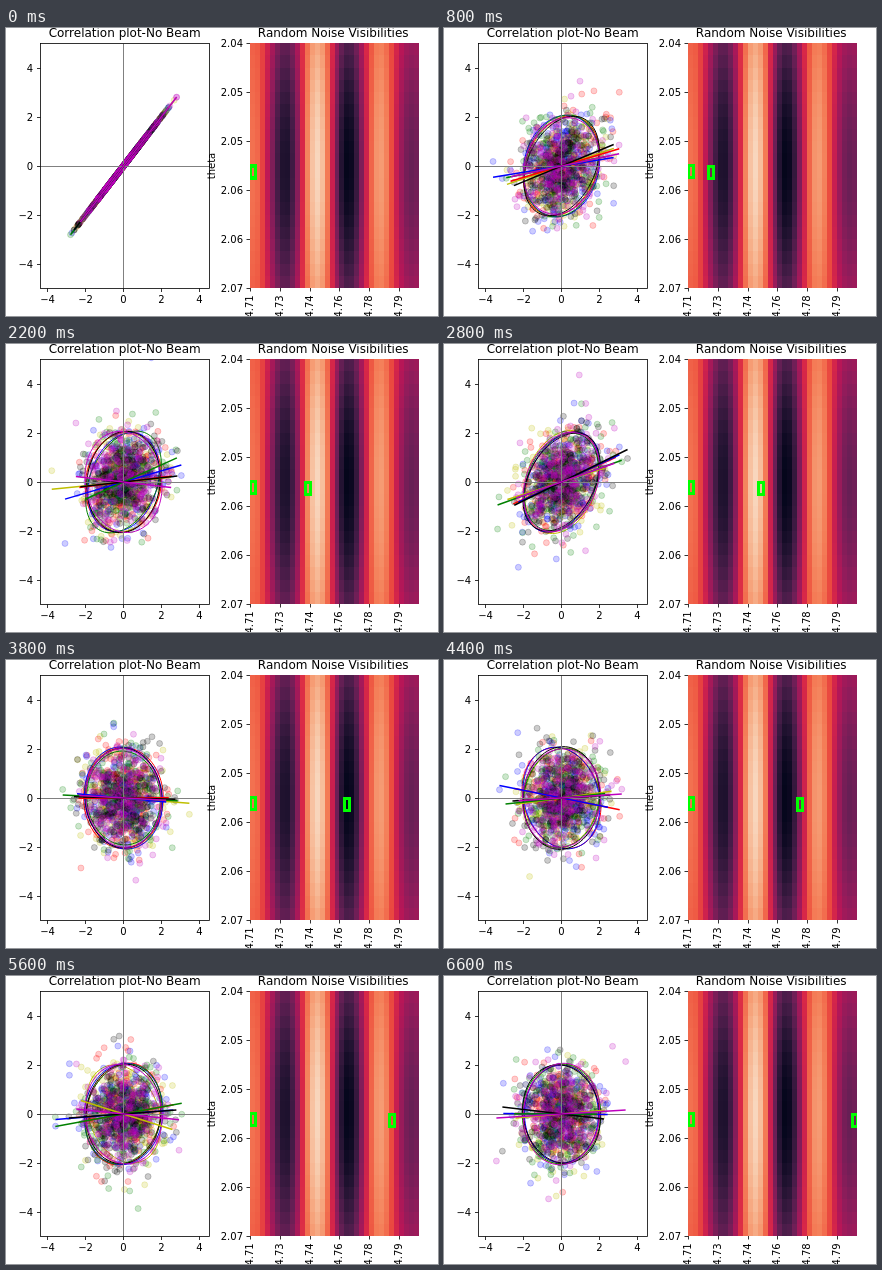
Recreate the animation shown at these times as an HTML page with a canvas. Size 432 by 288 pixels, loop 6.8 s.

```html
<!DOCTYPE html>
<html lang="en">
<head>
<meta charset="utf-8">
<title>Correlation plot</title>
<style>
  html, body { margin: 0; width: 100%; height: 100%; overflow: hidden; background: #fff; }
  canvas, svg { position: absolute; left: 0; top: 0; width: 432px; height: 288px; }
  text { font: 10px "DejaVu Sans", sans-serif; fill: #000; }
  .title { font-size: 12px; }
  line, rect { stroke: #000; stroke-width: .8; fill: none; }
</style>
</head>
<body>
<canvas id="plot" width="432" height="288"></canvas>
<svg id="axes" viewBox="0 0 432 288"></svg>
<script>
const STEP = 200, STEPS = 34, POINTS = 190;
const BOX = { x: 34.5, y: 15.5, w: 169, h: 245 };
const OX = 117.5, OY = 138, UX = 18.9, UY = 24.5;
const HEAT = { x: 244, y: 15, w: 169, h: 245, cols: 34, rows: 20 };
const CW = HEAT.w / HEAT.cols, CH = HEAT.h / HEAT.rows;
const COLORS = ['#bfbf00', '#ff0000', '#0000ff', '#008000', '#000000', '#bf00bf'];
const ctx = document.getElementById('plot').getContext('2d');

// Key points of the correlation: step, value
const RHO = [[0, 1], [5, .15], [8, -.1], [14, .32], [19, -.02], [33, 0]];

const RAMP = ['03051a', '221331', '451c47', '6a1f56', '921c5b', 'b91657',
  'd92847', 'ed503e', 'f47d57', 'f6a47c', 'f7c9aa', 'faebdd']
  .map(h => [0, 2, 4].map(i => parseInt(h.slice(i, i + 2), 16)));

function rng(seed) {
  let s = seed * 7919 + 17 | 0;
  return () => {
    s = s + 0x6d2b79f5 | 0;
    let t = Math.imul(s ^ s >>> 15, 1 | s);
    t = t + Math.imul(t ^ t >>> 7, 61 | t) ^ t;
    return ((t ^ t >>> 14) >>> 0) / 4294967296;
  };
}

const gauss = r => Math.sqrt(-2 * Math.log(1 - r())) * Math.cos(2 * Math.PI * r());

function meanRho(k) {
  const i = Math.max(1, RHO.findIndex(p => p[0] >= k));
  const [a, u] = RHO[i - 1], [b, v] = RHO[i];
  return u + (v - u) * (1 - Math.cos(Math.PI * (k - a) / (b - a))) / 2;
}

function ramp(v) {
  const p = Math.min(.9999, Math.max(0, v)) * (RAMP.length - 1), i = Math.floor(p);
  return `rgb(${RAMP[i].map((c, n) => Math.round(c + (RAMP[i + 1][n] - c) * (p - i)))})`;
}

// Fringes under a wide bell, flatter and lighter towards top and bottom
function heat(col, row) {
  const fringe = .49 * Math.cos(2 * Math.PI * (col - 12.9) / 13.1) * Math.exp(-(((col - 15) / 18) ** 2));
  const fade = 1 - Math.cos((row - 9.5) / 10 * Math.PI / 2);
  return .46 + fringe * (1 - .35 * fade) + .05 * fade;
}

function drawHeat() {
  for (let r = 0; r < HEAT.rows; r++) {
    const y0 = Math.round(HEAT.y + r * CH), y1 = Math.round(HEAT.y + (r + 1) * CH);
    for (let c = 0; c < HEAT.cols; c++) {
      const x0 = Math.round(HEAT.x + c * CW), x1 = Math.round(HEAT.x + (c + 1) * CW);
      ctx.fillStyle = ramp(heat(c, r));
      ctx.fillRect(x0, y0, x1 - x0, y1 - y0);
    }
  }
}

function drawCell(col, y) {
  ctx.strokeStyle = '#00ff00';
  ctx.lineWidth = 3;
  ctx.strokeRect(Math.round(HEAT.x + col * CW) + .5, y, 5, 12);
}

function dot(x, y) {
  ctx.beginPath();
  ctx.arc(x, y, 3, 0, 2 * Math.PI);
  ctx.fill();
  ctx.stroke();
}

function segment(x0, y0, x1, y1) {
  ctx.beginPath();
  ctx.moveTo(x0, y0);
  ctx.lineTo(x1, y1);
  ctx.stroke();
}

// Scatter and two-sigma ellipse of one colour; returns its fit line
function drawSeries(k, c) {
  const r = rng(k * 6 + c + 1), rho = meanRho(k);
  const slope = rho + .1 * gauss(r) * (1 - rho * rho);
  const rest = Math.sqrt(Math.max(0, 1 - slope * slope));
  let lo = 0, hi = 0;
  ctx.fillStyle = ctx.strokeStyle = COLORS[c];
  ctx.lineWidth = 1;
  ctx.globalAlpha = .2;
  for (let n = 0; n < POINTS; n++) {
    const x = gauss(r), y = slope * x + rest * gauss(r);
    lo = Math.min(lo, x);
    hi = Math.max(hi, x);
    dot(OX + x * UX, OY - y * UY);
  }
  ctx.globalAlpha = 1;

  const sx = 2.01 + .04 * gauss(r), sy = 2.03 + .04 * gauss(r);
  ctx.beginPath();
  for (let i = 0; i <= 90; i++) {
    const t = i / 45 * Math.PI;
    ctx.lineTo(OX + sx * UX * Math.cos(t), OY - sy * UY * (slope * Math.cos(t) + rest * Math.sin(t)));
  }
  ctx.stroke();
  return { lo, hi, slope };
}

function clipped(b, paint) {
  ctx.save();
  ctx.beginPath();
  ctx.rect(b.x, b.y, b.w, b.h);
  ctx.clip();
  paint();
  ctx.restore();
}

function drawScatter(k) {
  const fits = COLORS.map((_, c) => drawSeries(k, c));
  ctx.strokeStyle = '#808080';
  ctx.lineWidth = 1;
  segment(BOX.x, 138.5, BOX.x + BOX.w, 138.5);
  segment(117.5, BOX.y, 117.5, BOX.y + BOX.h);
  ctx.lineWidth = 1.5;
  fits.forEach((f, c) => {
    ctx.strokeStyle = COLORS[c];
    segment(OX + f.lo * UX, OY - f.slope * f.lo * UY, OX + f.hi * UX, OY - f.slope * f.hi * UY);
  });
}

function draw(k) {
  ctx.clearRect(0, 0, 432, 288);
  clipped(BOX, () => drawScatter(k));
  clipped(HEAT, () => {
    drawHeat();
    drawCell(0, 137.5);
    drawCell(k, 138.5);
  });
}

function buildAxes() {
  const out = [];
  const line = (x1, y1, x2, y2) => out.push(`<line x1="${x1}" y1="${y1}" x2="${x2}" y2="${y2}"/>`);
  const text = (s, x, y, anchor, extra = '') =>
    out.push(`<text x="${x}" y="${y}" text-anchor="${anchor}" ${extra}>${s}</text>`);
  const upright = (s, x, y, anchor) => text(s, x, y, anchor, `transform="rotate(-90 ${x} ${y})"`);
  const sign = v => v < 0 ? '\u2212' + -v : v;

  out.push(`<rect x="${BOX.x}" y="${BOX.y}" width="${BOX.w}" height="${BOX.h}"/>`);
  for (let v = -4; v <= 4; v += 2) {
    const x = Math.round(OX + v * UX - .5) + .5, y = OY - v * UY + .5;
    line(x, 260.5, x, 264);
    line(31, y, 34.5, y);
    text(sign(v), x, 274.6, 'middle');
    text(sign(v), 27.2, y + 3, 'end');
  }
  ['2.04', '2.05', '2.05', '2.06', '2.06', '2.07'].forEach((s, i) => {
    const y = 15.5 + i * 49;
    line(240.5, y, 244, y);
    text(s, 237, y + 3.2, 'end');
  });
  ['4.71', '4.73', '4.74', '4.76', '4.78', '4.79'].forEach((s, i) => {
    const x = Math.round(HEAT.x + i * 6 * CW) + .5;
    line(x, 260, x, 263.5);
    upright(s, x + 2.7, 267.3, 'end');
  });
  upright('theta', 209, 138, 'middle');
  text('Correlation plot-No Beam', 118.7, 9.2, 'middle', 'class="title"');
  text('Random Noise Visibilities', 327.2, 9.2, 'middle', 'class="title"');
  document.getElementById('axes').innerHTML = out.join('');
}

buildAxes();
let shown = -1;
const start = performance.now();
function tick() {
  const k = Math.floor((performance.now() - start) / STEP) % STEPS;
  if (k !== shown) draw(shown = k);
  requestAnimationFrame(tick);
}
tick();
</script>
</body>
</html>
```
